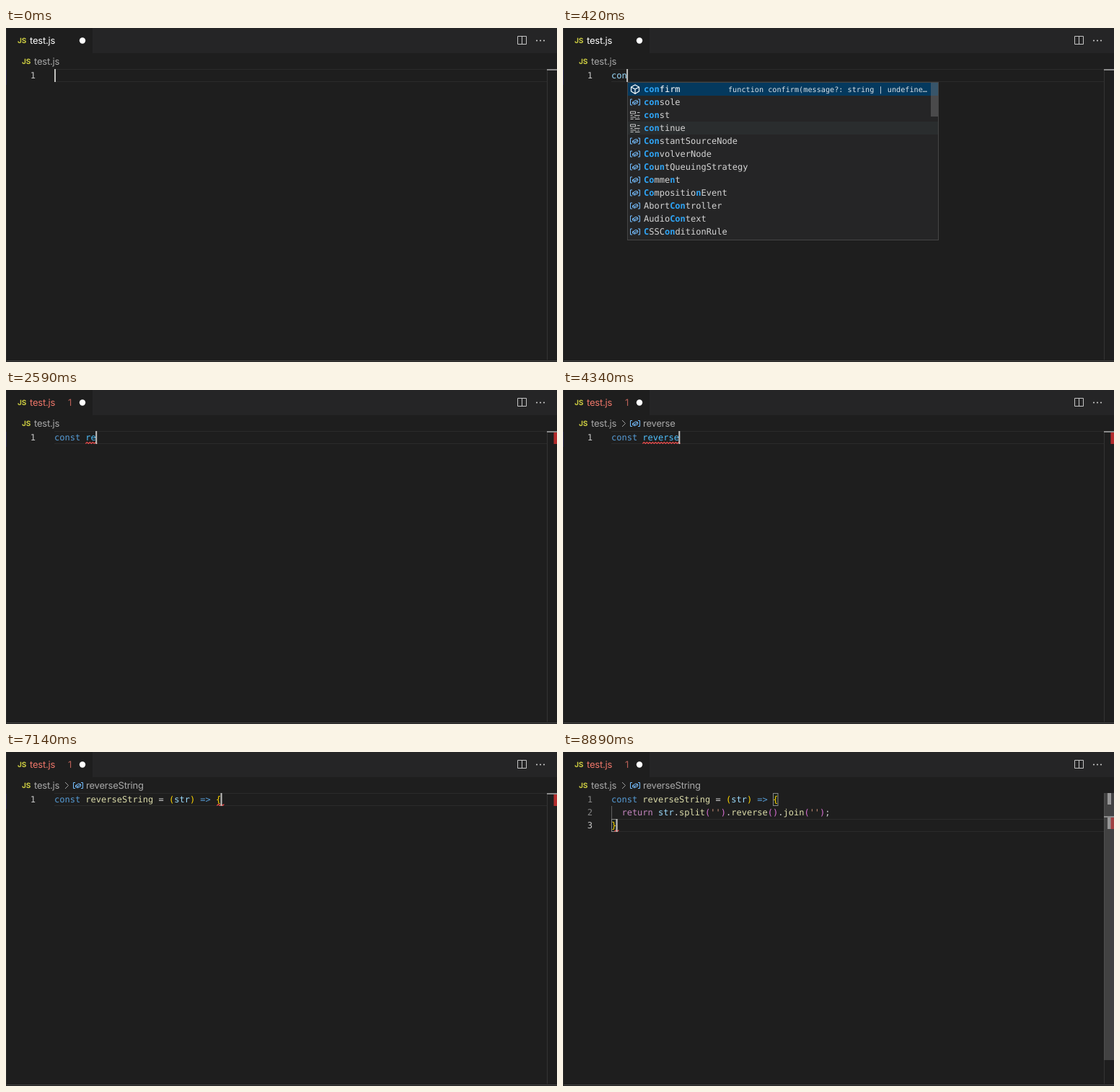
Write an HTML page that moves like this. It is 764x464 px and loops after 8.96 s.

```html
<!DOCTYPE html>
<html lang="en">
<head>
<meta charset="utf-8">
<title>Editor typing</title>
<style>
  html, body { margin: 0; width: 100%; height: 100%; overflow: hidden; background: #1e1e1e; }
  svg { display: block; width: 764px; height: 464px; }
  text { white-space: pre; text-rendering: geometricPrecision; }
  .code { font: 12px "DejaVu Sans Mono", monospace; }
  .detail { font: 10.2px "DejaVu Sans Mono", monospace; }
  .ui { font: 13px Inter, sans-serif; letter-spacing: -0.2px; }
  .js { font: bold 10px Inter, sans-serif; fill: #cbcb41; }
  .hit { font-weight: bold; fill: #2ea5f7; }
</style>
</head>
<body>
<svg id="stage" viewBox="0 0 764 464"></svg>
<script>
const LOOP = 8960, LEFT = 67, TOP = 57, ROW = 18, CHAR = 7.224;
const C = {
  fg: '#d4d4d4', key: '#569cd6', name: '#4fc1ff', param: '#9cdcfe', fn: '#dcdcaa',
  gold: '#ffd700', pink: '#da70d6', str: '#ce9178', flow: '#c586c0', ghost: '#6b6b6b',
  error: '#f14c4c', icon: '#75beff'
};

// Matched letters are in square brackets; the first sign picks the icon.
const LISTS = {
  con: `m[con]firm
v[con]sole
k[con]st
k[con]tinue
v[Con]stantSourceNode
v[Con]volverNode
v[Co]u[n]tQueuingStrategy
v[Co]mme[n]t
v[Co]mpositio[n]Event
vAbort[Con]troller
vAudio[Con]text
v[C]SSC[on]ditionRule`,
  const: `k[const]
v[Const]antSourceNode
v[Co]u[n]tQueuing[St]rategy
vEvent[Co]u[nts]
v[C]SSC[o]u[n]ter[St]yleRule
v[Co]mpo[s]itionEve[nt]
v[C]l[os]eEve[nt]
v[c]ust[o]mEleme[nts]
vHTMLForm[Cont]rol[s]Collection
v[c]ross[O]rigi[n]I[s]ola[t]ed
v[C]ust[o]mEleme[n]tRegi[st]ry
vGeolocation[Co]ordi[n]a[t]e[s]`
};
const DETAIL = { con: 'function confirm(message?: string | undefine…', const: 'const' };

const HEAD = ' = (str) => {';
const start = {
  name: '', typed: '', ghost: '', list: '', err: 0, wave: null, crumb: '',
  caret: 1, arrow: 0, fn: 0, body: 0, bar: 0
};
const STEPS = [
  [70, { typed: 'c' }],
  [140, { list: 'con' }],
  [210, { typed: 'co' }],
  [420, { typed: 'con' }],
  [560, { typed: 'cons', list: 'const' }],
  [700, { typed: 'const' }],
  [1050, { wave: [4.45, 5.4] }],
  [1120, { err: 1 }],
  [1260, { caret: 0 }],
  [1540, { typed: 'const ', list: '', caret: 1, wave: [5.45, 6.4] }],
  [2030, { caret: 0 }],
  [2520, { name: 'r', caret: 1, wave: [6, 7] }],
  [2590, { name: 're', wave: [6, 8] }],
  [2870, { name: 'rev', wave: [6, 9] }],
  [3150, { name: 'reve', wave: [6, 10] }],
  [3360, { name: 'rever', wave: [6, 11] }],
  [3570, { name: 'revers', wave: [6, 12] }],
  [3990, { name: 'reverse', wave: [6, 13] }],
  [4340, { crumb: 'reverse' }],
  [4410, { ghost: HEAD }],
  [4620, { name: 'reverseS', ghost: '' }],
  [4900, { name: 'reverseSt' }],
  [5180, { name: 'reverseStr' }],
  [5250, { name: 'reverseStri' }],
  [5390, { name: 'reverseStrin' }],
  [5460, { name: 'reverseString' }],
  [5530, { wave: [6, 19] }],
  [5950, { crumb: 'reverseString' }],
  [6090, { ghost: HEAD }],
  [6650, { ghost: '', arrow: 1, wave: null }],
  [6720, { wave: [31.2, 32.4] }],
  [7140, { fn: 1 }],
  [7560, { caret: 0 }],
  [7910, { caret: 1 }],
  [8050, { body: 1, bar: 0.4 }],
  [8120, { bar: 0.75 }],
  [8190, { bar: 1 }],
  [8610, { body: 2, wave: null }],
  [8820, { wave: [0.6, 1.4] }]
];

const col = n => LEFT + n * CHAR;
const rect = (x, y, w, h, fill, more = '') =>
  `<rect x="${x}" y="${y}" width="${w}" height="${h}" fill="${fill}" ${more}/>`;
const text = (x, y, s, fill, cls = 'code', more = '') =>
  `<text x="${x}" y="${y}" class="${cls}" fill="${fill}" ${more}>${s}</text>`;
const line = (d, color, w = 1) =>
  `<path d="${d}" fill="none" stroke="${color}" stroke-width="${w}"/>`;
const esc = s => s.replace(/&/g, '&amp;').replace(/</g, '&lt;').replace(/>/g, '&gt;');

// Draws [string, colour] runs one after the other on a code row.
function runs(row, from, parts) {
  const spans = parts.map(([s, fill]) => `<tspan fill="${fill}">${esc(s)}</tspan>`).join('');
  return text(col(from), TOP + row * ROW + 13, spans, C.fg);
}

function wave(x0, x1, row) {
  const y = TOP + row * ROW + 16.5;
  let d = `M${x0} ${y + 1}`;
  for (let x = x0, up = 1; x < x1; x += 2, up = !up) d += `L${x + 2} ${y + (up ? -1 : 1)}`;
  return line(d, C.error, 1.1);
}

const icons = {
  v: (x, y, c) => line(`M${x - 4} ${y - 4}h-2.5v8h2.5M${x + 4} ${y - 4}h2.5v8h-2.5`, c) +
    line(`M${x - 3.5} ${y}l4.5 -2.6l2.8 1.2v2.4l-4.5 2.2l-2.8 -1.2zl2.8 1.1l4.5 -2.5M${x - 0.7} ${y + 1.1}v2`, c),
  k: (x, y, c) => line(`M${x - 6.5} ${y - 5}h7v3h-7zM${x + 3} ${y - 3.5}h3.5M${x - 6.5} ${y + 0.5}h3M${x - 1} ${y + 0.5}h7.5` +
    `M${x - 6.5} ${y + 3}h8M${x + 3.5} ${y + 3}h2M${x - 6.5} ${y + 5.5}h4M${x} ${y + 5.5}h6.5`, c),
  m: (x, y, c) => line(`M${x} ${y - 6}l5.5 3v6l-5.5 3.3l-5.5 -3.3v-6zM${x - 5.5} ${y - 3}l5.5 3l5.5 -3M${x} ${y}v6`, c, 1.2)
};

function popup(s) {
  const x = Math.round(col(s.typed.length)), top = TOP + ROW;
  let out = rect(x + 0.5, top + 0.5, 431, 219, '#252526', 'stroke="#454545"');
  out += rect(x + 1, top + 1, 430, ROW, '#04395e') + rect(x + 1, top + 1 + 3 * ROW, 430, ROW, '#2a2d2e');
  LISTS[s.list].split('\n').forEach((item, i) => {
    const y = top + 10 + i * ROW, kind = item[0];
    const label = item.slice(1).replace(/\[/g, '<tspan class="hit">').replace(/\]/g, '</tspan>');
    out += icons[kind](x + 11, y, kind == 'v' ? C.icon : i ? '#c5c5c5' : '#fff');
    out += text(x + 23, y + 4, label, i ? C.fg : '#fff');
  });
  const end = s.list == 'con' ? 416 : 421;
  out += text(x + end, top + 13.5, DETAIL[s.list], '#d8e0e6', 'detail', 'text-anchor="end"');
  if (s.list == 'con') out += rect(x + 421, top + 1, 10, 47, '#797979', 'opacity=".45"');
  return out;
}

function frame(s) {
  const bad = '#f0776a';
  let out = rect(0, 0, 764, 464, '#1e1e1e') + rect(120, 0, 644, 35, '#252526');
  out += text(16, 21, 'JS', '', 'js') + text(33, 22, 'test.js', s.err ? bad : '#fff', 'ui');
  if (s.err) out += text(86, 22, '1', bad, 'ui', 'opacity=".75"');
  out += '<circle cx="106" cy="17.5" r="4.2" fill="#fff"/>';
  out += line('M709.5 11.5h12v11h-12zM715.5 11.5v11', '#c5c5c5');
  for (const x of [736, 741, 746]) out += `<circle cx="${x}" cy="17.5" r="1.1" fill="#c5c5c5"/>`;

  out += text(22, 50, 'JS', '', 'js') + text(39, 51, 'test.js', '#a9a9a9', 'ui');
  if (s.crumb) {
    out += line('M82 42l4.5 4.5l-4.5 4.5', '#a0a0a0') + icons.v(100, 46.5, C.icon);
    out += text(111, 51, s.crumb, '#a9a9a9', 'ui');
  }
  return out;
}

function editor(s) {
  const done = s.body == 2, row = done ? 2 : 0, y = TOP + row * ROW;
  let out = line(`M${LEFT} ${y + 0.5}H750M${LEFT} ${y + 17.5}H750`, '#2b2b2b');
  for (let i = 0; i <= row; i++)
    out += text(41, TOP + i * ROW + 13, i + 1, i == row ? '#c6c6c6' : '#858585', 'code', 'text-anchor="end"');

  const known = s.typed.startsWith('const');
  const parts = [[s.typed, known ? C.key : C.param], [s.name, s.fn ? C.fn : C.name]];
  if (s.arrow) parts.push([' = ', C.fg], ['(', C.gold], ['str', C.param], [')', C.gold], [' => ', C.key], ['{', C.gold]);
  if (s.ghost) parts.push([s.ghost, C.ghost]);

  if (s.body) out += line(`M${LEFT + 0.5} ${TOP + ROW}v18`, done ? '#606060' : '#404040');
  if (done) for (const [c, r] of [[31, 0], [0, 2]])
    out += rect(Math.round(col(c)) + 0.5, TOP + r * ROW + 0.5, 6.5, 17, '#1d241d', 'stroke="#888"');
  out += runs(0, 0, parts);
  if (s.body) {
    const lines = [
      ['  return ', C.flow], ['str', C.param], ['.', C.fg], ['split', C.fn], ['(', C.pink], ["''", C.str], [')', C.pink],
      ['.', C.fg], ['reverse', C.fn], ['()', C.pink], ['.', C.fg], ['join', C.fn], ['(', C.pink], ["''", C.str],
      [')', C.pink], [';', C.fg]
    ];
    const tint = p => done ? p : [p[0], C.ghost];
    out += runs(1, 0, lines.map(tint)) + runs(2, 0, [tint(['}', C.gold])]);
  }
  if (s.wave) out += wave(col(s.wave[0]), col(s.wave[1]), row);

  const at = done ? 1 : s.typed.length + s.name.length + (s.arrow ? HEAD.length : 0);
  if (s.caret) out += rect(col(at) - (at ? 0.6 : 0), y, 2, ROW, '#c0c0be');
  return out;
}

function edges(s) {
  const done = s.body == 2;
  let out = line('M750.5 57V461', '#333') + rect(0, 462, 764, 1, '#484848') + rect(0, 0, 1, 464, '#2a2a2a');
  if (!done) out += rect(0, 58, 1, 21, '#2c2c4a');
  if (s.bar) out += rect(750, TOP, 14, 371, '#797979', `opacity="${0.4 * s.bar}"`);
  if (done) out += rect(755, 57, 5, 16, '#969696') + rect(755, 91, 5, 16, '#969696');
  if (s.err) out += rect(759.5, done ? 91 : 59, 4.5, 16, done ? '#a0413f' : '#b32b2b');
  return out + rect(750, done ? 89 : 57, 14, 2, '#8a8a8a');
}

const stage = document.getElementById('stage');
let shown = -1;

function draw(t) {
  const past = STEPS.filter(([at]) => at <= t);
  if (past.length == shown) return;
  shown = past.length;
  const s = Object.assign({}, start, ...past.map(p => p[1]));
  stage.innerHTML = frame(s) + editor(s) + edges(s) + (s.list ? popup(s) : '');
}

function tick() {
  draw((performance.now() - begin) % LOOP);
  requestAnimationFrame(tick);
}
const begin = performance.now();
tick();
</script>
</body>
</html>
```
